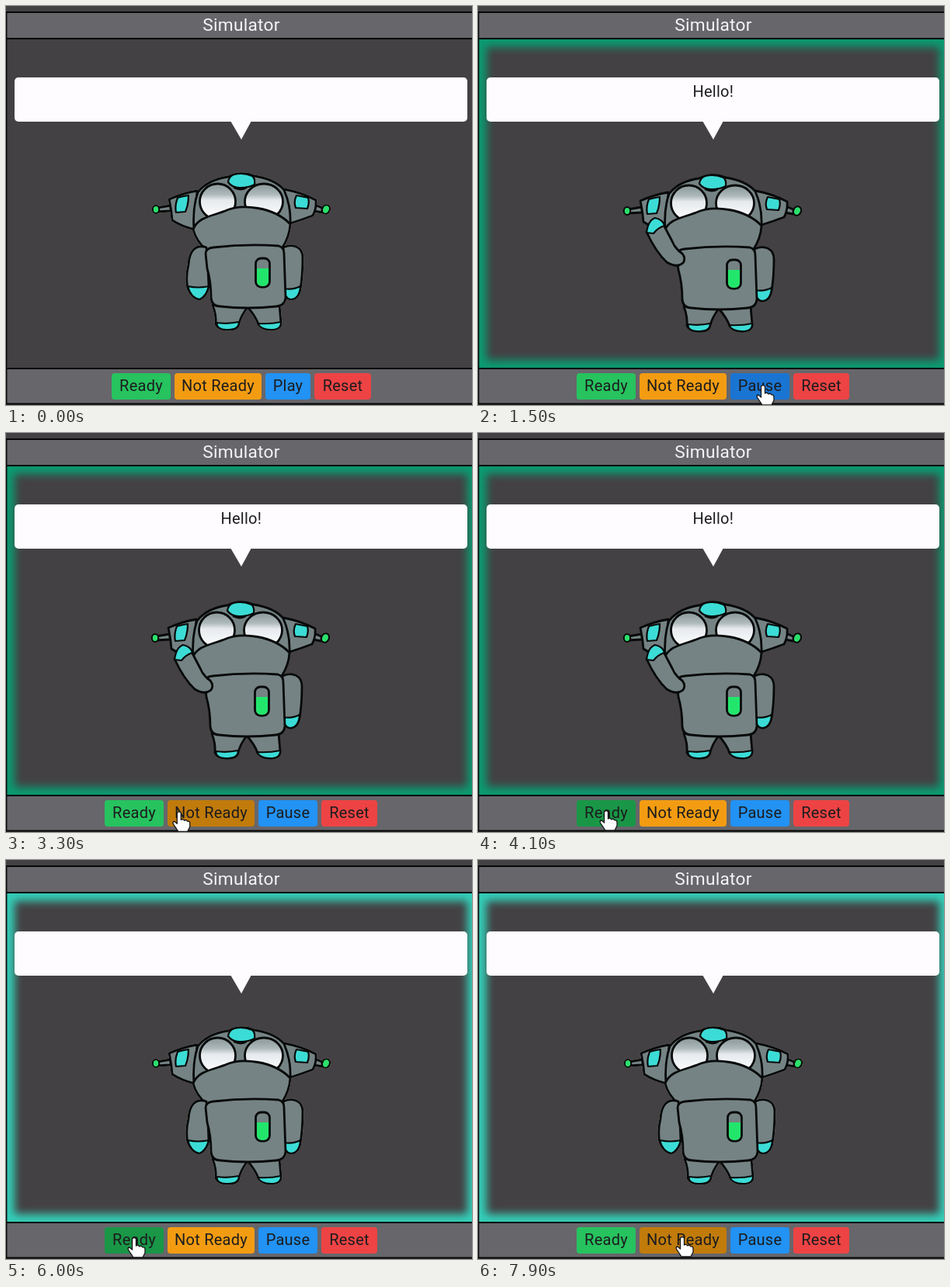
An HTML page for the animation above (8000 ms loop, 600x514 px).

```html
<!DOCTYPE html>
<html lang="en">
<head>
<meta charset="utf-8">
<title>Simulator</title>
<style>
html, body { margin: 0; width: 100%; height: 100%; overflow: hidden; background: #434143; }
#stage { position: relative; width: 600px; height: 514px; overflow: hidden; }
#glow { position: absolute; left: 1px; top: 43px; width: 603px; height: 423px; }
svg { position: absolute; left: 0; top: 0; }
text { font-family: Roboto, Arial, sans-serif; font-size: 20px; letter-spacing: .25px; text-anchor: middle; fill: #1c1c1e; }
.robot { fill: #758384; stroke: #080a0a; stroke-width: 2.8; stroke-linejoin: round; stroke-linecap: round; }
#neutral { filter: drop-shadow(0 0 .7px #c4c4c4); }
.cyan { fill: #3cdcd6; stroke-width: 2.2; }
.green { fill: #2be06b; stroke-width: 2; }
</style>
</head>
<body>
<div id="stage">
  <div id="glow"></div>
  <svg width="600" height="514" viewBox="0 0 600 514">
    <defs>
      <linearGradient id="eye" x2="0" y2="1">
        <stop offset=".1" stop-color="#94a1a2"/>
        <stop offset=".3" stop-color="#aeb9bb"/>
        <stop offset=".46" stop-color="#e6eaed"/>
        <stop offset="1" stop-color="#fff"/>
      </linearGradient>
      <g id="head">
        <path d="M194 260L212 257V264L194 265Z"/>
        <ellipse class="green" cx="193" cy="262" rx="4.2" ry="5"/>
        <path d="M397 256L407 260V266L396 264Z"/>
        <ellipse class="green" cx="412" cy="262" rx="4.800" ry="6" transform="rotate(25 412 262)"/>
        <path d="M210 249Q228 241 246 238L243 288Q226 284 214 276Q213 262 210 249Z"/>
        <path d="M358 236Q380 240 399 250Q400 261 395 270Q382 275 366 280Z"/>
        <path class="cyan" d="M221 247Q228 245 235 244Q235 256 231 265L219 266Q217 257 221 247Z"/>
        <path class="cyan" d="M374 244L389 247Q391 254 388 261L373 260Q370 252 374 244Z"/>
        <path d="M242 288Q240 260 247 240C255 229 270 222 286 220Q303 212 320 219C338 222 351 228 358 237Q367 257 366 281Z"/>
        <path class="cyan" d="M286 227Q287 219 294 217Q305 214 317 219Q321 222 320 230Q312 234 303 234Q292 235 286 227Z"/>
        <path d="M294 234Q302 238 309 234" fill="none"/>
        <ellipse cx="272.500" cy="252" rx="23" ry="23" fill="url(#eye)"/>
        <ellipse cx="332" cy="252" rx="24.500" ry="23" fill="url(#eye)"/>
        <path d="M241 288C247 272 264 271 282 264C304 254 345 259 366 281Q365 297 356 311L258 314Q245 303 241 288Z"/>
      </g>
      <g id="body">
        <path d="M266 385Q271 398 270 410Q273 417 286 417Q299 417 300 409Q303 398 311 388Q321 399 325 410Q331 417 342 417Q354 416 354 408L352 385Z"/>
        <path class="cyan" d="M271 408Q285 410 300 407Q300 417 286 417Q272 418 271 408Z"/>
        <path class="cyan" d="M324 409Q340 410 354 407Q355 417 341 417Q328 417 324 409Z"/>
        <path d="M357 311C370 305 382 311 382 324Q382 347 379 365Q376 378 367 378Q358 377 358 362Z"/>
        <path class="cyan" d="M358 364Q370 366 379 361Q378 377 367 378Q358 377 358 364Z"/>
        <path d="M257 319Q257 312 267 311Q310 306 351 309Q358 311 358 319L360 376Q359 386 348 387Q310 391 276 387Q265 387 264 376Q264 355 259 338Z"/>
        <rect x="321.500" y="325" width="18" height="37" rx="7"/>
        <path d="M323 338H338V354Q338 361 330.500 361Q323 361 323 354Z" fill="#22e66c" stroke="none"/>
      </g>
    </defs>

    <path d="M0 9H600V41H0ZM0 468H600V512H0Z" fill="#67666b"/>
    <path d="M0 8H600M0 42H600M0 467H600M0 512.500H600M.5 8V513" stroke="#080808" stroke-width="1.800"/>
    <text x="303" y="32" style="font-size:22.700px;fill:#f4f4f6">Simulator</text>
    <rect x="11" y="92" width="583" height="57" rx="5" fill="#fefcff"/>
    <path d="M289 148H316L303 172Z" fill="#fefcff"/>
    <text id="speech" x="302.800" y="116.500">Hello!</text>

    <g id="neutral" class="robot">
      <use href="#head"/>
      <path d="M258 311C243 306 236 317 235 333Q231 350 234 364Q240 377 249 378Q259 373 261 361L260 338Z"/>
      <path class="cyan" d="M234 361Q247 364 261 361Q258 374 249 378Q238 376 234 361Z"/>
      <use href="#body"/>
    </g>
    <g id="waving" class="robot">
      <g transform="translate(-1 2)"><use href="#head"/><use href="#body"/></g>
      <path d="M217 291Q229 317 243 330Q256 338 264 331Q268 325 263 319Q254 313 250 303L239 282Z"/>
      <path class="cyan" d="M217 292Q219 276 228 273Q238 275 240 283Q231 286 226 293Z"/>
    </g>

    <g id="buttons"></g>
    <g id="cursor" stroke="#161616" stroke-width="1.300" stroke-linejoin="round" fill="#fff">
      <path id="hand" transform="translate(1 -1)" d="M-2.500 1Q0-2 2.500 1V10Q5 8 7 11Q9 9 11 12Q14 11 14 15V19L11 25H-1L-7 16Q-9 12-6 12L-2.500 15Z"/>
      <path id="arrow" d="M0 0V20L5 15L8 23L12 21L8 14H15Z"/>
    </g>
  </svg>
</div>
<script>
const LOOP = 8000, PLAY = 1500, READY = 4500;
const $ = id => document.getElementById(id);
const show = (id, on) => $(id).style.display = on ? '' : 'none';

// Cursor stops: time, x, y
const stops = [
  [100, 440, 516], [900, 368, 492], [1000, 366, 490],
  [2600, 366, 490], [2800, 327, 490], [3500, 180, 489], [3700, 164, 488],
  [6500, 164, 488], [6900, 219, 489], [7300, 262, 487], [LOOP, 262, 487]
];

const buttons = [
  { label: 'Ready', base: '#27c35f', hover: '#199747', before: [136, 76], after: [127, 76] },
  { label: 'Not Ready', base: '#f39c12', hover: '#c17b0b', before: [217, 112], after: [208, 112] },
  { label: 'Play', base: '#2292f4', hover: '#1a74d2', before: [334, 58], after: [325, 76] },
  { label: 'Reset', base: '#ee4344', hover: '#c93334', before: [397, 73], after: [406, 72] }
];

function add(tag, attrs) {
  const el = document.createElementNS('http://www.w3.org/2000/svg', tag);
  for (const name in attrs) el.setAttribute(name, attrs[name]);
  return $('buttons').appendChild(el);
}
for (const b of buttons) {
  b.rect = add('rect', { y: 473, height: 34, rx: 4 });
  b.text = add('text', { y: 496 });
  b.text.textContent = b.label;
}

function cursorAt(t) {
  const i = Math.max(1, stops.findIndex(s => s[0] > t));
  const [t0, x0, y0] = stops[i - 1], [t1, x1, y1] = stops[i];
  const k = (t - t0) / (t1 - t0);
  return [x0 + (x1 - x0) * k, y0 + (y1 - y0) * k];
}

function draw(t) {
  const started = t >= PLAY, greeting = started && t < READY;
  const [cx, cy] = cursorAt(t), visible = t >= 100;
  let overButton = false;

  for (const b of buttons) {
    const [x, width] = started ? b.after : b.before;
    const over = visible && cx >= x && cx < x + width && cy >= 473 && cy < 507;
    overButton ||= over;
    b.rect.setAttribute('x', x);
    b.rect.setAttribute('width', width);
    b.rect.setAttribute('fill', over ? b.hover : b.base);
    b.text.setAttribute('x', x + width / 2);
  }
  buttons[2].text.textContent = started ? 'Pause' : 'Play';

  $('glow').style.boxShadow = started
    ? `inset 0 0 11px 10px ${greeting ? '#0b9b71' : '#34cfb9'}` : 'none';
  show('speech', greeting);
  show('waving', greeting);
  show('neutral', !greeting);
  show('cursor', visible);
  show('hand', overButton);
  show('arrow', !overButton);
  $('cursor').setAttribute('transform', `translate(${cx} ${cy})`);
}

function tick() {
  draw(performance.now() % LOOP);
  requestAnimationFrame(tick);
}
tick();
</script>
</body>
</html>
```
